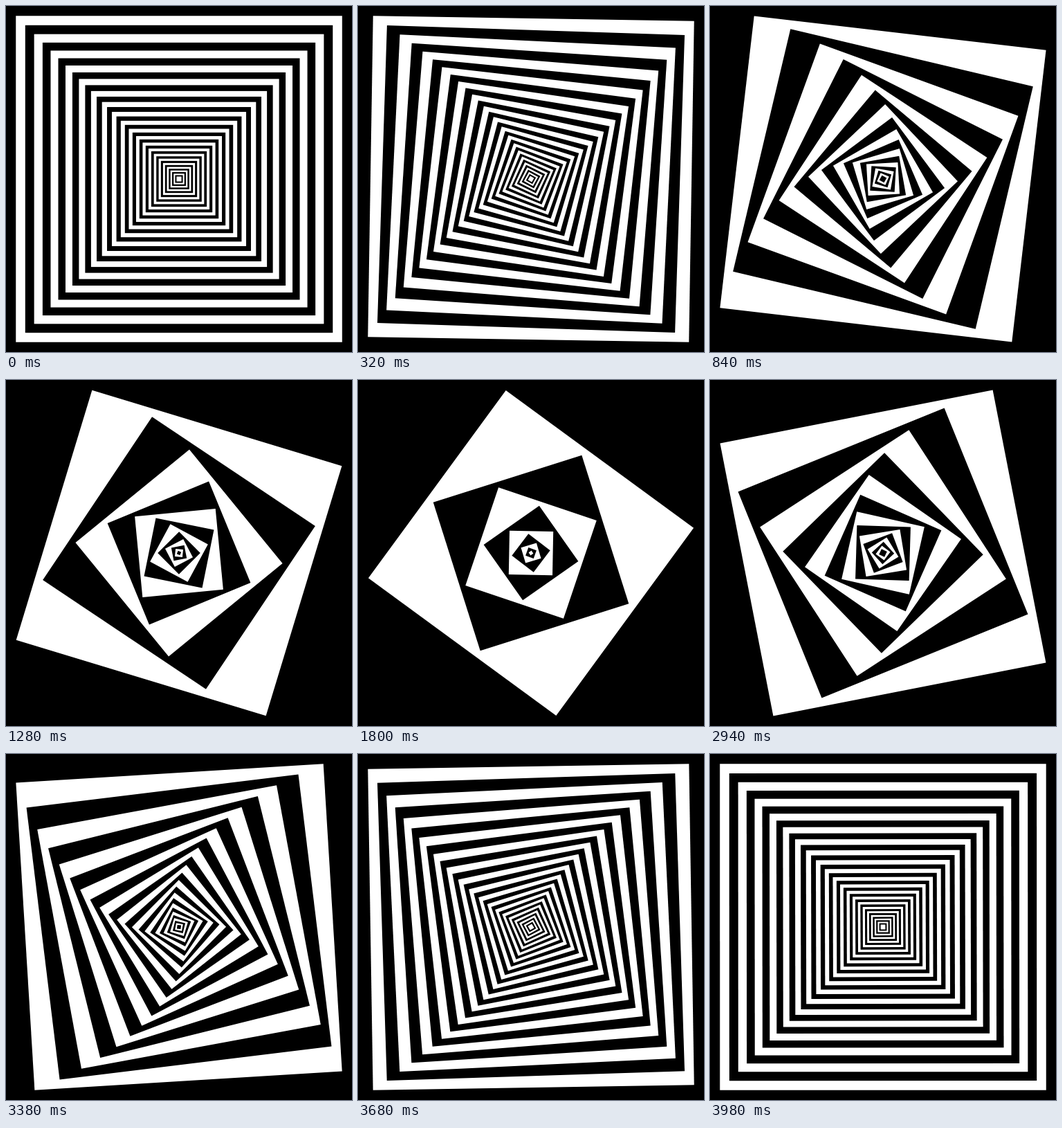
An HTML page with a canvas for the animation above (4 s loop, 500 by 500 pixels).

```html
<!DOCTYPE html>
<html lang="en">
<head>
<meta charset="utf-8">
<title>Turning squares</title>
<style>
  html, body { margin: 0; width: 100%; height: 100%; overflow: hidden; background: #000; }
  canvas { display: block; }
</style>
</head>
<body>
<canvas id="stage" width="500" height="500"></canvas>
<script>
const ctx = document.getElementById('stage').getContext('2d');
const LOOP = 4000;
const HALF = 250;
const SMALLEST = 2;
const SHRINK = 0.95;
const INSET = 1.75;

// Symmetric Bezier easing with half-length handles, solved in closed form.
function ease(p) {
  const u = Math.sinh(Math.asinh(4 * (p - 0.5)) / 3);
  return 0.5 + 1.5 * u - 2 * u ** 3 - 0.045 * u * (0.25 - u * u);
}

// Each square turns by the same angle inside the one before and shrinks to fit.
function draw(time) {
  const angle = ease(time % LOOP / LOOP) * Math.PI / 2;
  const fit = SHRINK / (Math.cos(angle) + Math.sin(angle));

  ctx.setTransform(1, 0, 0, 1, HALF, HALF);
  let white = false;
  for (let half = HALF; half > SMALLEST; half = half * fit - INSET) {
    ctx.fillStyle = white ? '#fff' : '#000';
    ctx.fillRect(-half, -half, 2 * half, 2 * half);
    ctx.rotate(angle);
    white = !white;
  }
}

function tick() {
  draw(performance.now());
  requestAnimationFrame(tick);
}
tick();
</script>
</body>
</html>
```
